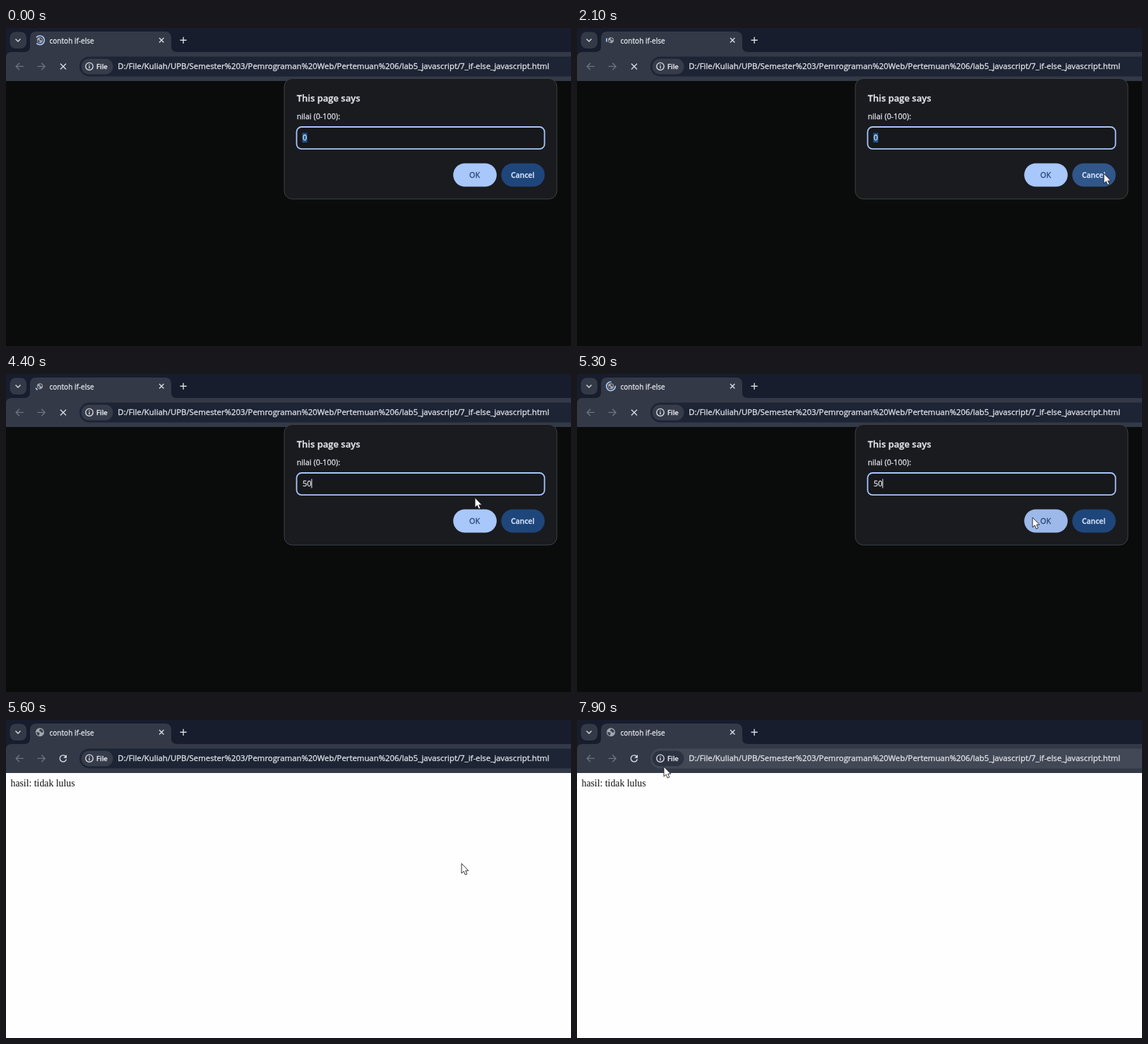
Recreate the animation shown at these times as an HTML page. Size 800 px wide and 450 px high, loop 8000 ms.

```html
<!DOCTYPE html>
<html lang="id">
<head>
<meta charset="utf-8">
<title>contoh if-else</title>
<style>
html, body { margin: 0; width: 100%; height: 100%; overflow: hidden; background: #0a0c0c; }
#stage { position: relative; width: 800px; height: 450px; overflow: hidden; }
svg { position: absolute; left: 0; top: 0; overflow: visible; }
text { --ink: #e3e5ea; font-family: "Open Sans", "Noto Sans", sans-serif; fill: var(--ink); stroke: var(--ink); stroke-width: .3; white-space: pre; }
.line { fill: none; stroke: #d8dbe2; stroke-width: 1.4; }
.dim { stroke: #6d727e; }
.semi { font-weight: 600; }
.serif { --ink: #111; font-family: "Liberation Serif", serif; font-size: 13.77px; stroke: none; }
#dialog { left: 394px; top: 71px; transform-origin: 193px 0; }
</style>
</head>
<body>
<div id="stage">
  <svg width="800" height="450" viewBox="0 0 800 450">
    <rect id="page" width="800" height="450"/>
    <text class="serif" id="result" x="6.5" y="94">hasil: tidak lulus</text>

    <rect width="800" height="60" fill="#171d2c"/>
    <path d="M0 75V42Q0 34 8 34H26Q34 34 34 26V14Q34 5 43 5H225Q234 5 234 14V26Q234 34 242 34H800V75Z" fill="#333947"/>
    <rect x="5.5" y="5.5" width="23.5" height="23.5" rx="8" fill="#333947"/>
    <path class="line" d="M13.5 15.5L17 19L20.5 15.5"/>

    <g id="globe">
      <circle r="6" fill="#a4a8b0"/>
      <path d="M-4.8 -.6C-3 .2 -1 -.1 -.3 1.2C.2 2.4 -1.4 2.4 -1.2 4.7C-3.5 4.2 -5 2 -4.8 -.6ZM0 -4.6C2.5 -4.7 4.5 -3 4.8 -.4C3.5 -.1 3.4 1.2 2.2 .6C1.4 0 1.9 -1.2 .2 -1.3C-1.4 -1.5 -.9 -3.2 0 -4.6Z" fill="#3b414e"/>
    </g>
    <path id="spinner" fill="none" stroke="#a8c7fa" stroke-width="1.7" stroke-linecap="round"/>

    <text x="61.5" y="21.5" font-size="10.05">contoh if-else</text>
    <path class="line" d="M217 14L223.4 20.4M223.4 14L217 20.4M246.5 17.3H255.7M251.1 12.7V21.9"/>

    <path class="line dim" d="M24.8 54.4H14.5M19 49.6L14.2 54.4L19 59.2M44.5 54.4H54.8M50.3 49.6L55.1 54.4L50.3 59.2"/>
    <path id="stop" class="line" d="M77 50.4L85 58.4M85 50.4L77 58.4"/>
    <g id="reload">
      <path class="line" d="M84.6 51.8A4.6 4.6 0 1 0 85.4 55.3"/>
      <path d="M86 49V53.7H81.3Z" fill="#d8dbe2"/>
    </g>

    <rect id="bar" x="104" y="40.5" width="720" height="28" rx="14"/>
    <rect id="chip" x="106.5" y="43.5" width="45" height="22" rx="11"/>
    <circle class="line" cx="118" cy="54.3" r="5.2"/>
    <path class="line" d="M118 53.6V57.2M118 51.2V52.5"/>
    <text class="semi" x="128" y="57.8" font-size="9.5">File</text>
    <text x="158.2" y="58.3" font-size="11.37">D:/File/Kuliah/UPB/Semester%203/Pemrograman%20Web/Pertemuan%206/lab5_javascript/7_if-else_javascript.html</text>
  </svg>

  <svg id="dialog" width="387" height="172" viewBox="394 71 387 172">
    <rect x="394" y="71.5" width="386" height="170.5" rx="11.5" fill="#191b1f" stroke="#3d4046"/>
    <text class="semi" x="411.7" y="104" font-size="13">This page says</text>
    <text x="411.7" y="129" font-size="10.85">nilai (0-100):</text>
    <rect id="field" x="411.5" y="140" width="351" height="31.2" rx="7"/>
    <rect id="select" x="419.5" y="148.5" width="7" height="13.5" fill="#1f5592"/>
    <text id="value" x="420" y="159.2" font-size="10.8"></text>
    <rect id="caret" y="148.5" width="1" height="13" fill="#f0f2f5"/>
    <rect id="ok" x="633.2" y="191.5" width="61.6" height="33" rx="16.5"/>
    <text x="656" y="212.3" font-size="10.8" style="--ink:#24416f">OK</text>
    <rect id="cancel" x="701.2" y="191.5" width="61.6" height="33" rx="16.5"/>
    <text class="semi" x="715" y="212.3" font-size="10.4" style="--ink:#d6e4fc">Cancel</text>
  </svg>

  <svg width="800" height="450" viewBox="0 0 800 450">
    <path id="arrow" d="M0 0V14L3.2 11.1L5.3 16L7.8 14.9L5.7 10.2H9.8Z" fill="#fff" stroke="#1a1a1a" stroke-width=".9"/>
    <path id="beam" d="M-3.2 -6.2H-.8L0 -5.6L.8 -6.2H3.2M0 -5.6V5.6M-3.2 6.2H-.8L0 5.6L.8 6.2H3.2" fill="none" stroke="#e8e8e8" stroke-width="1.2"/>
  </svg>
</div>
<script>
const LOOP = 8000, STEP = 100, CLICK = 5400;
const FIRST_KEY = 2300, SECOND_KEY = 4100;
const $ = id => document.getElementById(id);
const set = (id, attrs) => { for (const k in attrs) $(id).setAttribute(k, attrs[k]); };
const show = (id, on) => { $(id).style.display = on ? "" : "none"; };

// time, x, y of the pointer's hot spot
const path = [
  [0, 640, 470], [100, 642, 321], [400, 646, 212], [700, 648, 168], [1000, 648, 168],
  [1500, 752, 203], [1800, 746, 206], [2750, 746, 206], [3200, 644, 155], [3800, 644, 155],
  [4300, 664, 175], [4600, 664, 175], [5000, 645, 203], [7400, 645, 203], [7900, 123, 66], [8000, 123, 66]
];

function pointer(t) {
  const i = path.findIndex(p => p[0] > t);
  const [t0, x0, y0] = path[i - 1], [t1, x1, y1] = path[i];
  const u = (t - t0) / (t1 - t0), e = u * u * (3 - 2 * u);
  return [x0 + (x1 - x0) * e, y0 + (y1 - y0) * e];
}

// cubic-bezier(.4, 0, .2, 1)
function fastOutSlowIn(x) {
  let lo = 0, hi = 1;
  for (let i = 0; i < 20; i++) {
    const s = (lo + hi) / 2, r = 1 - s;
    if (1.2 * s * r * r + 0.6 * s * s * r + s ** 3 < x) lo = s; else hi = s;
  }
  return 3 * lo * lo * (1 - lo) + lo ** 3;
}

function spinnerPath(t) {
  const e = t + 1362, arc = 666, max = 270;
  const start = 270 + 360 * e / 1568 + max * (Math.floor(e / (2 * arc)) % 4);
  let sweep = max * fastOutSlowIn(e % arc / arc);
  if (Math.floor(e / arc) % 2 === 0) sweep -= max;
  if (Math.abs(sweep) < 5) sweep = 5;
  const at = deg => {
    const a = deg * Math.PI / 180;
    return (48 + 6.3 * Math.cos(a)).toFixed(2) + " " + (17.3 + 6.3 * Math.sin(a)).toFixed(2);
  };
  return `M${at(start)}A6.3 6.3 0 ${+(Math.abs(sweep) > 180)} ${+(sweep > 0)} ${at(start + sweep)}`;
}

const inside = (x, y, l, t, r, b) => x >= l && x <= r && y >= t && y <= b;

function drawBrowser(t, open, x, y) {
  set("page", { fill: open ? "#0a0c0c" : "#fefefe" });
  show("result", !open);
  show("stop", open);
  show("reload", !open);
  show("spinner", open);
  if (open) set("spinner", { d: spinnerPath(t) });
  set("globe", { transform: `translate(48 17.3) scale(${t <= CLICK ? 0.68 : 1})` });
  const hot = !open && inside(x, y, 104, 40, 800, 68);
  set("bar", { fill: hot ? "#424856" : "#1d2434" });
  set("chip", { fill: hot ? "#2c3240" : "#363c4a" });
}

function drawDialog(t, open, x, y) {
  const closing = (t - CLICK) / 100;
  show("dialog", closing < 2);
  const d = $("dialog").style;
  d.opacity = open ? 1 : 0.66 - 0.5 * closing;
  d.transform = open ? "none" : `translateY(${-9.5 - 2 * closing}px) perspective(1000px) rotateX(${6 + 2 * closing}deg) scale(.998)`;
  set("field", open
    ? { stroke: "#a8c7fa", "stroke-width": 1.8, fill: "#16181c" }
    : { stroke: "#77797d", "stroke-width": 1, fill: "#191b1f" });

  const text = t < FIRST_KEY ? "0" : t < SECOND_KEY ? "5" : "50";
  const typed = t < SECOND_KEY ? FIRST_KEY : SECOND_KEY;
  $("value").textContent = text;
  show("select", t < FIRST_KEY);
  show("caret", open && t >= FIRST_KEY && (t - typed) % 1000 < 500);
  set("caret", { x: 420 + 6.18 * text.length });

  const over = left => open && inside(x, y, left, 192, left + 60, 224);
  set("ok", { fill: over(634) ? "#9db9ea" : "#a8c7fa" });
  set("cancel", { fill: over(702) ? "#30568a" : "#1f467b" });
}

function draw(t) {
  const open = t < CLICK;
  const [x, y] = pointer(t);
  drawBrowser(t, open, x, y);
  drawDialog(t, open, x, y);
  const typing = open && inside(x, y, 411, 140, 763, 171);
  show("beam", typing);
  show("arrow", !typing);
  set(typing ? "beam" : "arrow", { transform: `translate(${x.toFixed(1)} ${y.toFixed(1)})` });
}

const begin = performance.now();
function tick() {
  const t = (performance.now() - begin) % LOOP;
  draw(Math.floor(t / STEP) * STEP);
  requestAnimationFrame(tick);
}
draw(0);
requestAnimationFrame(tick);
</script>
</body>
</html>
```
